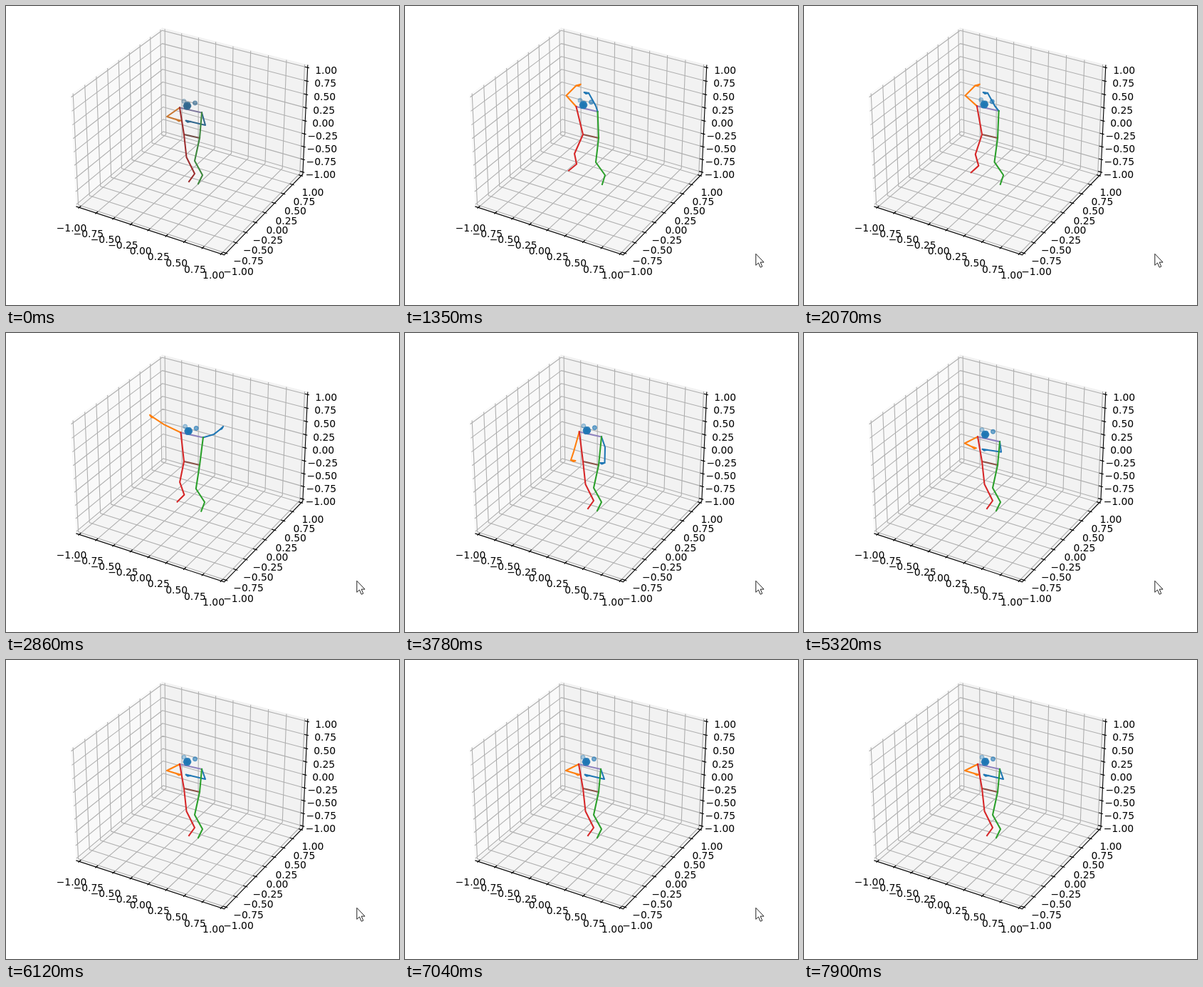
These frames come from a looping animation (552 px wide and 419 px high, 8000 ms). An HTML page:

```html
<!DOCTYPE html>
<html lang="en">
<head>
<meta charset="utf-8">
<title>3D pose plot</title>
<style>
  html, body { margin: 0; width: 100%; height: 100%; overflow: hidden; background: #fff; }
  svg { display: block; width: 552px; height: 419px; }
  text { font: 13.89px "DejaVu Sans", Verdana, sans-serif; text-anchor: middle; fill: #000; }
  .grid { stroke: #b0b0b0; stroke-width: 1.11; fill: none; stroke-linejoin: round; }
  .axis { stroke: #000; stroke-width: 1.11; fill: none; stroke-linecap: square; }
  .bone { fill: none; stroke-width: 2.08; stroke-linejoin: round; stroke-linecap: square; }
</style>
</head>
<body>
<svg id="stage" viewBox="0 0 552 419"></svg>
<script>
const LOOP = 8000, STEP = 105;
const stage = document.getElementById('stage');

function add(tag, attrs, parent = stage) {
  const el = document.createElementNS('http://www.w3.org/2000/svg', tag);
  for (const k in attrs) el.setAttribute(k, attrs[k]);
  parent.appendChild(el);
  return el;
}

// Perspective view: elevation 30, azimuth -60, distance 10.
function project([x, y, z]) {
  x *= 0.57143; y *= 0.57143; z *= 0.42857;
  const c = Math.sqrt(3) / 2;
  const k = 1997.8 / (10 - (c * x / 2 - 0.75 * y + z / 2));
  return [260.8 + k * (c * x + y / 2), 182.4 - k * (c * y / 2 + c * z - x / 4)];
}
const pathOf = pts => 'M' + pts.map(p => p.map(n => n.toFixed(2)).join(' ')).join('L');
const line = (cls, ...pts) => add('path', { class: cls, d: pathOf(pts.map(project)) });

const E = 1 + 1 / 24;                       // pane position
const F = E + 0.1729;                       // label position
const OUT = E + 1 / 60, IN = E - 1 / 30;    // tick ends

function pane(color, ...pts) {
  add('path', { d: pathOf(pts.map(project)) + 'Z', fill: color, stroke: color, 'stroke-width': 1.4 });
}

function drawAxes() {
  pane('#f9f9f9', [-E, -E, -E], [-E, E, -E], [-E, E, E], [-E, -E, E]);
  pane('#f2f2f2', [-E, E, -E], [E, E, -E], [E, E, E], [-E, E, E]);
  pane('#f5f5f5', [-E, -E, -E], [E, -E, -E], [E, E, -E], [-E, E, -E]);

  const ticks = Array.from({ length: 9 }, (_, i) => i / 4 - 1);
  for (const v of ticks) {
    line('grid', [v, -E, -E], [v, E, -E], [v, E, E]);
    line('grid', [E, v, -E], [-E, v, -E], [-E, v, E]);
    line('grid', [-E, -E, v], [-E, E, v], [E, E, v]);
  }
  line('axis', [-E, -E, -E], [E, -E, -E], [E, E, -E], [E, E, E]);
  for (const v of ticks) {
    line('axis', [v, -OUT, -E], [v, -IN, -E]);
    line('axis', [OUT, v, -E], [IN, v, -E]);
    line('axis', [OUT, E, v], [IN, E, v]);
    const label = (v < 0 ? '\u2212' : '') + Math.abs(v).toFixed(2);
    for (const at of [[v, -F, -F], [F, v, -F], [F, F, v]]) {
      const [x, y] = project(at);
      add('text', { x: (x - 0.4).toFixed(2), y: Math.round(y + 11.6) }).textContent = label;
    }
  }
}

const mix = (a, b, u) => (Array.isArray(a) ? a.map((v, i) => mix(v, b[i], u)) : a + (b - a) * u);
const progress = (t, from, to) => Math.min(1, Math.max(0, (t - from) / (to - from)));

// Right elbow and wrist, left elbow and wrist.
const arms = {
  guard:  [[226, 155], [239, 159], [280, 167], [259, 162]],
  up:     [[226.5, 125.5], [240.5, 111.5], [268, 140], [258, 122]],
  wide:   [[222, 128.5], [206, 119], [293, 142], [302, 136]],
  spread: [[216, 140], [192, 145], [300, 148], [316, 152]],
  down:   [[237, 166], [233, 178], [281, 160], [280.5, 182]],
  cross:  [[225, 152], [219, 161], [262, 165], [246, 172]]
};
// Time, arm pose, shoulder lean and drop, right leg lift.
const moves = [
  [400, 'guard', 0, 0.5, 0],
  [1350, 'up', -4.5, -1, 1],
  [2200, 'up', -1, -2, 0.8],
  [2860, 'wide', 2, -2.5, 0.6],
  [3250, 'spread', 2, -3, 0.4],
  [3780, 'down', 1, -3.5, 0],
  [4640, 'cross', 0, 0.5, 0],
  [5500, 'guard', 0, 4, 0]
];

// The hand curls inward when the forearm is steep.
function arm(shoulder, elbow, wrist, side) {
  const dx = wrist[0] - elbow[0], dy = wrist[1] - elbow[1], len = Math.hypot(dx, dy);
  const ux = dx / len, uy = dy / len;
  const hx = ux + side * uy * uy, hy = uy * (1 - uy * uy);
  const k = 6.5 / (Math.hypot(hx, hy) || 1);
  const tip = [wrist[0] + hx * k, wrist[1] + hy * k];
  const thumb = [tip[0] - hx * k * 0.4, tip[1] - hy * k * 0.4 + 1.5];
  return [shoulder, elbow, wrist, tip, thumb, wrist];
}

function pose(t) {
  const next = moves.findIndex(m => m[0] > t);
  const b = moves[next < 0 ? moves.length - 1 : next];
  const a = next < 0 ? b : moves[Math.max(0, next - 1)];
  const u = a === b ? 0 : progress(t, a[0], b[0]);
  const [rElbow, rWrist, lElbow, lWrist] = mix(arms[a[1]], arms[b[1]], u);
  const [lean, drop, lift] = mix(a.slice(2), b.slice(2), u);

  const rShoulder = [244 + lean * 0.8, 142 + drop];
  const lShoulder = [275 + lean, 149 + drop];
  const rHip = [250, 180], lHip = [272, 185];
  const rLeg = mix([[253.5, 212], [265, 235], [257, 246]], [[238, 207], [241, 221.5], [230, 230.5]], lift);
  const lLeg = mix([[265, 217], [276, 237], [270, 249]], [[268, 219], [281, 237], [277, 250]], lift);
  return {
    head: [254.5 + lean * 0.9, 139.5 + drop * 0.8],
    bones: {
      chest: [rShoulder, lShoulder],
      leftArm: arm(lShoulder, lElbow, lWrist, -1),
      rightArm: arm(rShoulder, rElbow, rWrist, 1),
      hips: [rHip, lHip],
      leftSide: [lShoulder, lHip, ...lLeg],
      rightSide: [rShoulder, rHip, ...rLeg]
    }
  };
}

drawAxes();

const colors = {
  chest: '#8f83be', leftArm: '#1f77b4', rightArm: '#ff7f0e',
  hips: '#8c564b', leftSide: '#2ca02c', rightSide: '#d62728'
};
const figure = add('g', {});
const bones = {};
for (const k in colors) bones[k] = add('path', { class: 'bone', stroke: colors[k] }, figure);

const head = add('g', { fill: colors.leftArm, stroke: colors.leftArm, 'stroke-width': 1.2 }, figure);
const dot = (cx, cy, alpha) =>
  add('circle', { cx, cy, r: 2.9, 'fill-opacity': alpha, 'stroke-opacity': alpha }, head);
dot(-4.5, -6.5, 0.35);
dot(11, -4, 0.6);
for (let i = 0; i < 6; i++) dot(2.4 * Math.cos(i * Math.PI / 3), 2.4 * Math.sin(i * Math.PI / 3), 0.8);

const cursor = add('path', {
  d: 'M.5 .5V16.5L4.2 13.2L6.9 19.4L9.5 18.3L6.9 12.3H11.8Z',
  fill: '#fff', stroke: '#222'
});
const REST = [492.3, 346.8];

function render(now) {
  const time = now % LOOP;
  const t = Math.round(time / STEP) * STEP;
  const p = pose(t);
  for (const k in bones) bones[k].setAttribute('d', pathOf(p.bones[k]));
  head.setAttribute('transform', `translate(${p.head})`);
  figure.style.filter = time < 200 ? 'saturate(.7) brightness(.9)' : 'none';

  const at = t < 4000
    ? mix([508, 420], REST, progress(t, 700, 1080))
    : mix(REST, [527, 420], progress(t, 7290, 7600));
  cursor.setAttribute('transform', `translate(${at})`);
}

const start = performance.now();
function tick() {
  render(performance.now() - start);
  requestAnimationFrame(tick);
}
tick();
</script>
</body>
</html>
```
